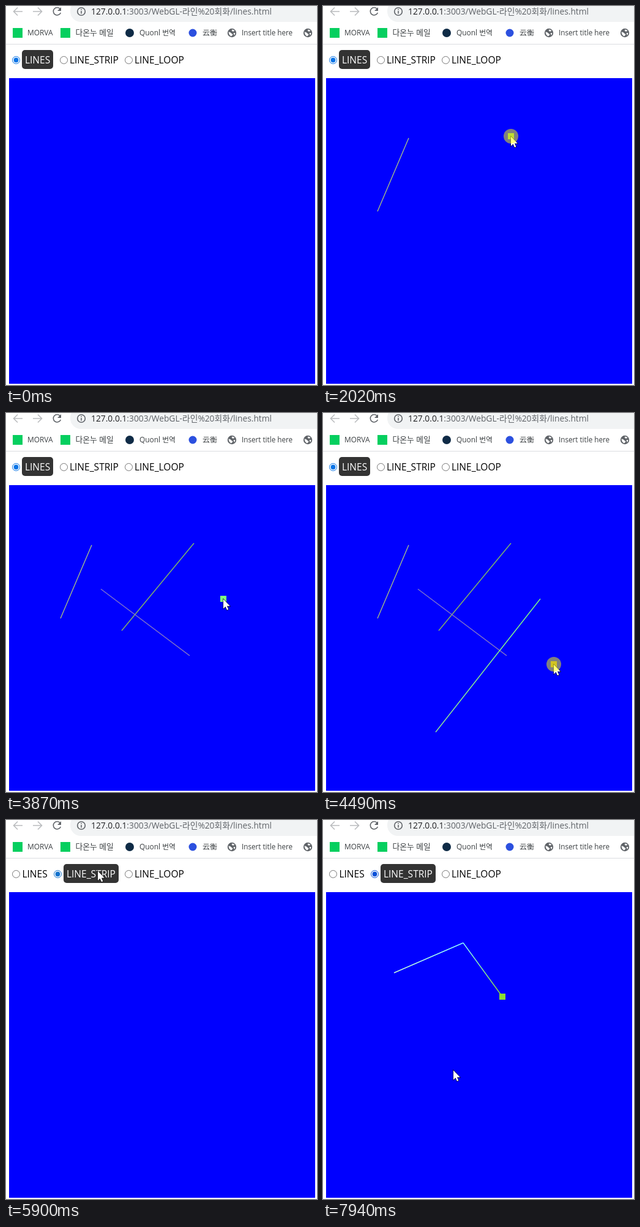
These frames come from a looping animation (508x620 px, 8 s). An HTML page with a canvas:

```html
<!DOCTYPE html>
<html lang="ko">
<head>
<meta charset="utf-8">
<title>lines</title>
<style>
html, body { margin: 0; width: 508px; height: 620px; overflow: hidden; background: #fff; }
svg, canvas { position: absolute; left: 0; top: 0; display: block; }
text { font-family: "Open Sans", "Noto Sans CJK KR", "Noto Sans CJK", sans-serif; }
.mark { font-size: 11.9px; fill: #3c4043; }
.url { font-size: 13.8px; fill: #5f6368; }
.label { font-size: 15.5px; fill: #000; }
.on .label { fill: #fff; }
</style>
</head>
<body>
<svg width="508" height="620" viewBox="0 0 508 620">
  <defs>
    <g id="globe">
      <circle r="7.2" fill="#5f6368"/>
      <path d="M-5.5-1.5Q-3-2-1.5 0T1.5 2Q1 4-1 5.5Q-5 4-5.5-1.5ZM0-5.5Q3-5.5 4.5-3.5Q3-2 1-2.5Q-1-3.5 0-5.5ZM2.5 0H5.5Q5 3 3.5 4Q3.5 2 2.5 0Z" fill="#fff"/>
    </g>
  </defs>
  <rect x="105" y="-9" width="440" height="35" rx="17" fill="#f1f3f4"/>
  <g fill="none" stroke-width="1.6">
    <path d="M27 9H13M19 2.5L12.5 9L19 15.5M44 9H58M52 2.5L58.5 9L52 15.5" stroke="#babcbe"/>
    <path d="M88.5 5A6.2 6.2 0 1 0 89.3 11" stroke="#5f6368"/>
    <circle cx="123" cy="9" r="6.3" stroke="#5f6368"/>
    <path d="M123 8V12.5M123 5V6.6" stroke="#5f6368"/>
  </g>
  <path d="M90 2V8H84Z" fill="#5f6368"/>
  <text class="url" x="139" y="14"><tspan fill="#202124">127.0.0.1</tspan>:3003/WebGL-라인%20회화/lines.html</text>
  <rect x="11" y="36" width="16" height="16" fill="#05cf5f"/>
  <rect x="89" y="36" width="16" height="16" fill="#05cf5f"/>
  <circle cx="202" cy="44" r="7" fill="#0f2b46"/>
  <circle cx="305" cy="44" r="6.5" fill="#2c50df"/>
  <use href="#globe" x="369" y="44"/>
  <use href="#globe" x="493" y="44"/>
  <g class="mark">
    <text x="35" y="48">MORVA</text>
    <text x="113.5" y="48" font-size="12.8">다온누 메일</text>
    <text x="218" y="48">Quonl 번역</text>
    <text x="321" y="48">云衡</text>
    <text x="385" y="48" font-size="11.7">Insert title here</text>
  </g>
  <rect y="62" width="508" height="1" fill="#dadce0"/>
  <g id="radios"></g>
  <rect x="5" y="118" width="500" height="500" fill="#00f"/>
</svg>
<canvas id="stage" width="508" height="620"></canvas>
<script>
const LOOP = 8000, START = 304, STEP = 68.1;
const SWITCH = 82;   // step at which LINE_STRIP becomes active
const HOLD = 3;      // steps a mouse press lasts
const g = document.getElementById("stage").getContext("2d");
const radios = document.getElementById("radios");

// pointer stops: step, x, y, and a vertex colour where a click adds a point
const stops = [
  [4, 181, 349],
  [8, 140, 216, "#a3bd8c"], [16, 89, 336, "#a5b980"],
  [24, 307, 213, "#80bd64"], [31, 189, 356, "#8cb45f"],
  [38, 155, 288, "#7d73cd"], [43, 300, 397, "#8c7dbe"],
  [49, 355, 304, "#80ff80"], [55, 184, 522, "#96eb91"],
  [61, 377, 411, "#a58746"], [65, 333, 462, "#9b8250"],
  [73, 148, 125], [78, 150, 83],
  [89, 116, 250, "#c8ffd7"], [95, 229, 201, "#8cffff"],
  [100, 281, 225], [103, 293, 289, "#8cde32"],
  [112, 213, 409]
].map(([step, x, y, color]) => ({ step, x, y, color }));

const points = stops.filter(s => s.color);
const presses = [...points.map(p => p.step), SWITCH - 2];
const pressed = step => presses.some(p => step >= p && step < Math.min(p + HOLD, p < SWITCH ? SWITCH : step + 1));
const ease = p => p * p * (3 - 2 * p);

// each move begins after the last release, and takes five steps at most
function pointer(step) {
  let x = 222, y = 481, free = 0;
  for (const s of stops) {
    const from = Math.max(free, s.step - (s.color ? 5 : 4));
    if (step <= from) break;
    const p = ease(Math.min(1, (step - from) / (s.step - from)));
    x += (s.x - x) * p;
    y += (s.y - y) * p;
    free = s.step + (s.color ? HOLD : 0);
  }
  return [Math.round(x), Math.round(y)];
}

function radio(x, text, textX, width, color) {
  const on = width > 0;
  const box = on ? `<rect x="${textX - 5}" y="72" width="${width}" height="31" rx="5" fill="#333"/>` : "";
  const dot = on ? `<circle cx="${x + 6.5}" cy="88.5" r="3.9" fill="${color}"/>` : "";
  return `<g class="${on ? "on" : ""}">${box}<circle cx="${x + 6.5}" cy="88.5" r="6" fill="#fff" stroke="${color}"/>${dot}` +
    `<text class="label" x="${textX}" y="94">${text}</text></g>`;
}

let shown = "";
function drawRadios(linked, hover) {
  const key = linked + "," + hover;
  if (key === shown) return;
  shown = key;
  const grey = "#767676";
  const first = linked
    ? radio(10, "LINES", 26.5, 0, grey) + radio(78, "LINE_STRIP", 99, 90, hover ? "#1272cc" : "#0650d8")
    : radio(10, "LINES", 31, 51, "#0a74e6") + radio(88, "LINE_STRIP", 104, 0, hover ? "#4f4f4f" : grey);
  radios.innerHTML = first + radio(194, "LINE_LOOP", 210, 0, grey);
}

function line(a, b) {
  const blend = g.createLinearGradient(a.x, a.y, b.x, b.y);
  blend.addColorStop(0, a.color);
  blend.addColorStop(1, b.color);
  g.strokeStyle = blend;
  g.lineWidth = 1.4;
  g.beginPath();
  g.moveTo(a.x, a.y);
  g.lineTo(b.x, b.y);
  g.stroke();
}

function drawScene(step, linked) {
  const live = points.filter(p => p.step <= step && p.step > SWITCH === linked);
  for (let i = 1; i < live.length; i += linked ? 1 : 2) line(live[i - 1], live[i]);
  if (live.length && (linked || live.length % 2)) {
    const { x, y, color } = live[live.length - 1];
    g.fillStyle = color;
    g.fillRect(x - 5, y - 5, 10, 10);
  }
}

const arrow = new Path2D("M.5.5V16L4 12.8L6.5 18.3L8.9 17.3L6.5 11.8H11.3Z");
function drawPointer(x, y, down) {
  g.save();
  g.translate(x - 0.5, y);
  g.lineWidth = 1.2;
  g.strokeStyle = "#000";
  g.fillStyle = "#fff";
  g.stroke(arrow);
  g.fill(arrow);
  g.restore();
  if (!down) return;
  g.fillStyle = "rgba(255,255,0,.5)";
  g.beginPath();
  g.arc(x, y, 12, 0, Math.PI * 2);
  g.fill();
}

function draw(now) {
  const step = Math.floor((now % LOOP - START) / STEP);
  const linked = step >= SWITCH;
  const [x, y] = pointer(step);
  const hover = step >= 0 && y >= 72 && y < 103;
  g.clearRect(0, 0, 508, 620);
  drawRadios(linked, hover);
  drawScene(step, linked);
  if (step >= 0) drawPointer(x, y, pressed(step));
}

let origin;
function tick(now) {
  origin ??= now;
  draw(now - origin);
  requestAnimationFrame(tick);
}
draw(0);
requestAnimationFrame(tick);
</script>
</body>
</html>
```
